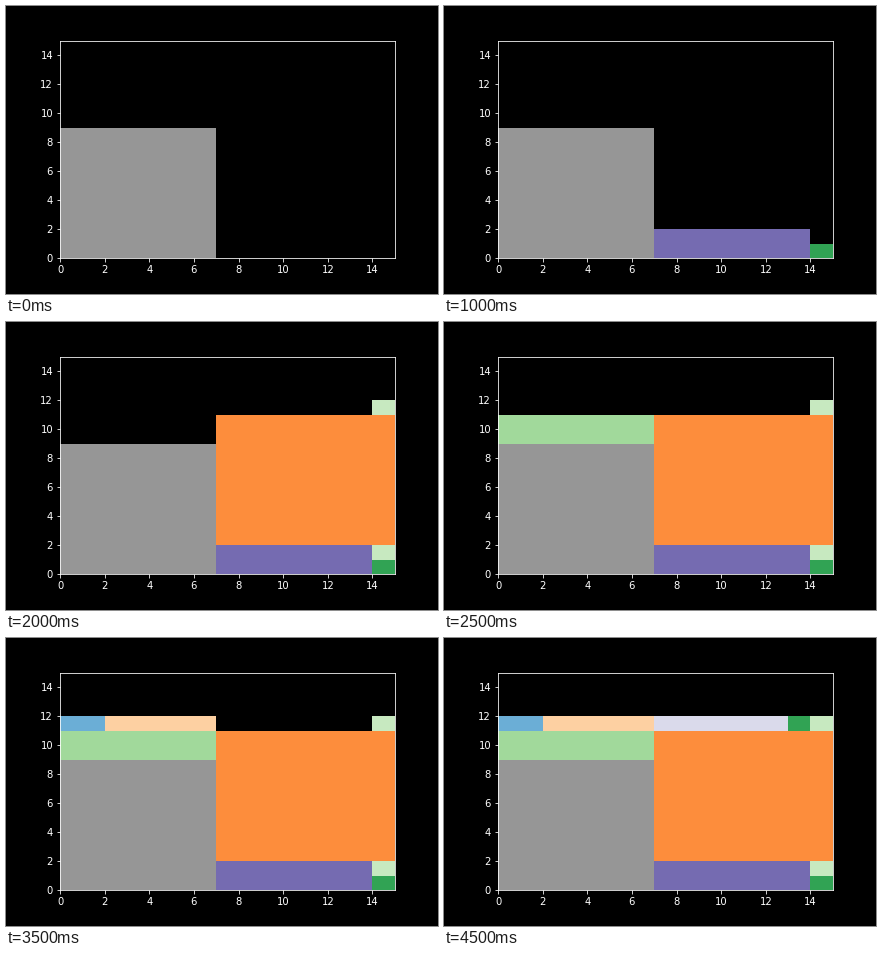
A matplotlib script for the animation above (5 s loop, 432 by 288 pixels).

```python
import matplotlib.pyplot as plt
from matplotlib.animation import FuncAnimation
from matplotlib.patches import Rectangle

plt.style.use("dark_background")
plt.rcParams["font.family"] = "DejaVu Sans"

SIZE = 15
STEP_MS = 500

# Each step places one or more blocks: (x, y, width, height, colour)
STEPS = [
    [(0, 0, 7, 9, "#969696")],
    [(7, 0, 7, 2, "#756bb1")],
    [(14, 0, 1, 1, "#31a354")],
    [(7, 2, 8, 9, "#fd8d3c")],
    [(14, 1, 1, 1, "#c7e9c0"), (14, 11, 1, 1, "#c7e9c0")],
    [(0, 9, 7, 2, "#a1d99b")],
    [(0, 11, 2, 1, "#6baed6")],
    [(2, 11, 5, 1, "#fdd0a2")],
    [(7, 11, 6, 1, "#dadaeb")],
    [(13, 11, 1, 1, "#31a354")],
]

fig, ax = plt.subplots(figsize=(6, 4), dpi=72)
fig.subplots_adjust(left=0.125, right=0.9, bottom=0.125, top=0.88)
ax.set_xlim(0, SIZE)
ax.set_ylim(0, SIZE)
ax.set_xticks(range(0, SIZE, 2))
ax.set_yticks(range(0, SIZE, 2))

blocks = []
for step, rects in enumerate(STEPS):
    for x, y, w, h, color in rects:
        patch = ax.add_patch(Rectangle((x, y), w, h, facecolor=color))
        blocks.append((step, patch))


def update(frame):
    for step, patch in blocks:
        patch.set_visible(step <= frame)
    return [patch for _, patch in blocks]


anim = FuncAnimation(fig, update, frames=len(STEPS), interval=STEP_MS,
                     repeat=True, repeat_delay=0, blit=False)
plt.show()
```
